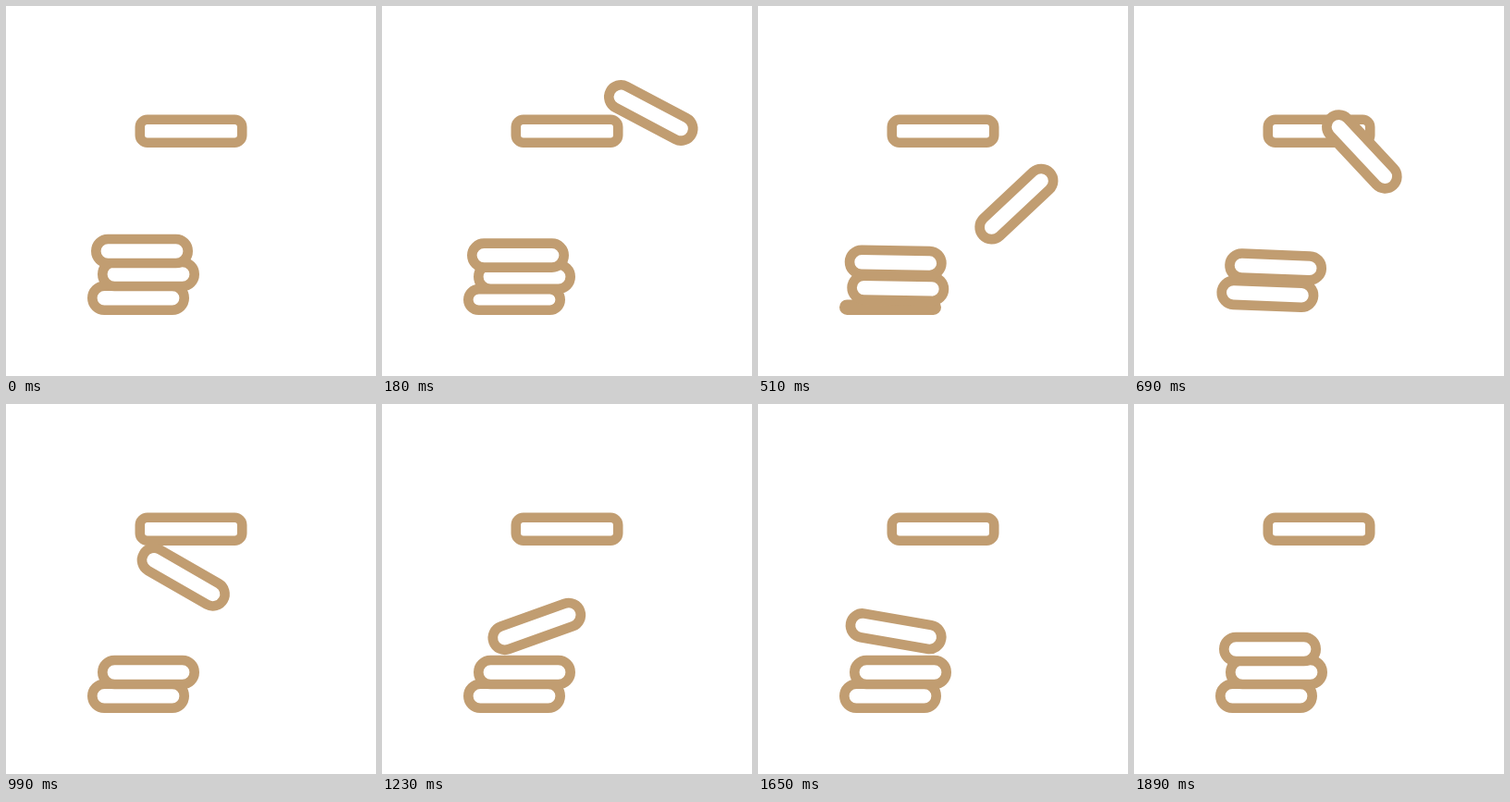
Recreate the animation shown at these times as an HTML page. Size 400 px wide and 400 px high, loop 2920 ms.

```html
<!DOCTYPE html>
<html lang="en">
<head>
<meta charset="utf-8">
<title>Stacking pills</title>
<style>
  @property --x { syntax: "<number>"; inherits: false; initial-value: 0; }
  @property --y { syntax: "<number>"; inherits: false; initial-value: 0; }
  @property --angle { syntax: "<number>"; inherits: false; initial-value: 0; }

  html, body { margin: 0; width: 100%; height: 100%; overflow: hidden; background: #fff; }
  svg { display: block; width: 100%; height: 100%; }
  rect { fill: #fff; stroke: #c19d71; stroke-width: 10.6px; }

  .pill {
    x: -49.7px; y: -13px; width: 99.4px; height: 26px; rx: 13px;
    transform: translate(calc(var(--x) * 1px), calc(var(--y) * 1px)) rotate(calc(var(--angle) * 1deg));
    animation: 2920ms infinite;
  }

  /* Both upper pills drop one place as the bottom one is pressed flat. */
  .stacked { animation-name: slide, sink, tilt; animation-timing-function: ease-in-out, var(--sinking), ease-in-out; }
  .middle { --from-x: 154; --to-x: 143; --from-y: 290; --to-y: 315.7; --sinking: cubic-bezier(.4, .1, .5, .8); }
  .top { --from-x: 147; --to-x: 154; --from-y: 265; --to-y: 290; --sinking: cubic-bezier(.4, .4, .8, .65); }
  @keyframes slide {
    0%, 12.3% { --x: var(--from-x); }
    27.4%, 100% { --x: var(--to-x); }
  }
  @keyframes sink {
    0% { --y: var(--from-y); }
    31.8%, 100% { --y: var(--to-y); }
  }
  @keyframes tilt {
    0%, 12.3%, 32.5%, 100% { --angle: 0; }
    23.6% { --angle: 2.3; }
  }

  .bottom { x: 93.3px; width: 99.4px; animation: press 2920ms ease-in infinite; }
  @keyframes press {
    0% { y: 302.7px; height: 26px; rx: 13px; }
    20.5%, 100% { y: 328.7px; height: 0; rx: 0; }
  }

  /* One and a half turns: drop in, arc to the left, bounce, settle on top. */
  .tossed { animation-name: drift, hop, spin; }
  @keyframes drift {
    0% { --x: 284; }
    11.3% { --x: 292; animation-timing-function: cubic-bezier(.28, .05, .25, 1); }
    64.7%, 100% { --x: 147; }
  }
  @keyframes hop {
    0% { --y: -30; animation-timing-function: ease-in-out; }
    12.3% { --y: 257; animation-timing-function: ease-in-out; }
    23.6% { --y: 157.5; animation-timing-function: cubic-bezier(.35, 0, .8, .6); }
    44.9% { --y: 265; animation-timing-function: ease-out; }
    50.3% { --y: 233.5; animation-timing-function: ease-in-out; }
    64.7%, 100% { --y: 265; }
  }
  @keyframes spin {
    0% { --angle: 0; animation-timing-function: cubic-bezier(.4, .12, .7, .5); }
    23.6% { --angle: 226; animation-timing-function: linear; }
    43.4% { --angle: 540; animation-timing-function: ease-out; }
    50.3% { --angle: 556; animation-timing-function: ease-in-out; }
    64.7%, 100% { --angle: 540; }
  }
</style>
</head>
<body>
<svg viewBox="0 0 400 400">
  <rect x="144.8" y="122.8" width="110.4" height="24.9" rx="8"/>
  <rect class="bottom"/>
  <rect class="pill stacked middle"/>
  <rect class="pill stacked top"/>
  <rect class="pill tossed"/>
</svg>
</body>
</html>
```
